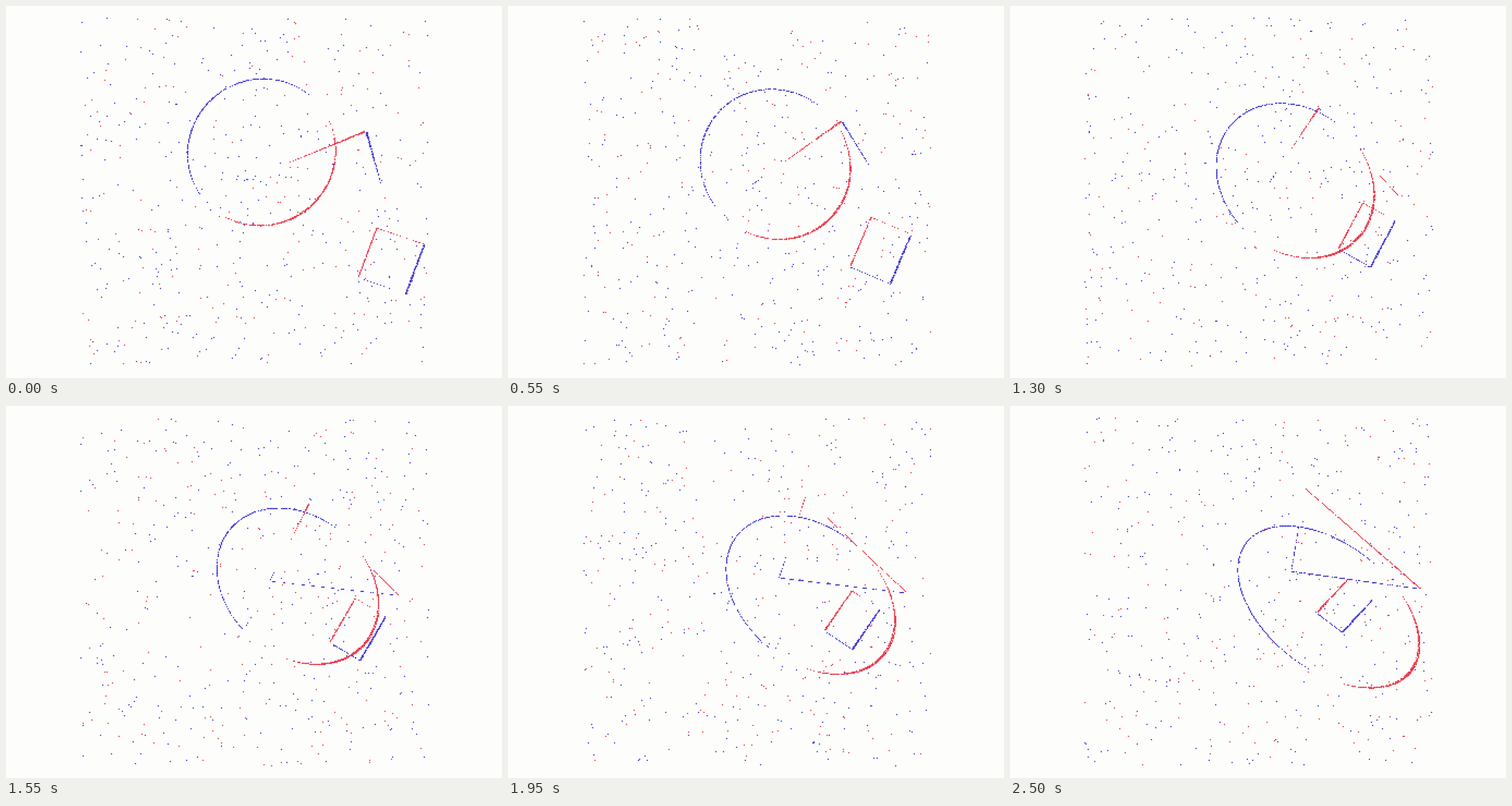
Write an HTML page with a canvas that moves like this. It is 640 by 480 pixels and loops after 2550 ms.

```html
<!DOCTYPE html>
<html lang="en">
<head>
<meta charset="utf-8">
<title>Event camera view of moving shapes</title>
<style>
html, body { margin: 0; width: 100%; height: 100%; overflow: hidden; background: #fdfdfc; }
canvas { display: block; width: 640px; height: 480px; }
</style>
</head>
<body>
<canvas id="view" width="640" height="480"></canvas>
<script>
const ctx = document.getElementById('view').getContext('2d');
const STEP = 50, STEPS = 51;
const N = 320, CELL = 450 / N, LEFT = 96, TOP = 15;
const BLUE = '#1a10c8', RED = '#e4142a', PAPER = '#fdfdfc';
const MIN_SHIFT = 0.3;  // slowest edge, in cells per step, that still fires
const NOISE = 500;

// A value that goes from a to b while the clip runs, off the straight way by bend halfway.
const move = (a, b, bend = 0) => u => a + (b - a) * u + bend * 4 * u * (1 - u);
const point = (x, y) => u => [x(u), y(u)];

const triangle = [
  point(move(304.5, 363.5), move(227, 213, 8)),
  point(move(463, 381, -23), move(161, 106, -1.5)),
  point(move(489, 531, -8.5), move(248, 236, 4))
];

// A parallelogram: its centre and half of each side.
const quad = {
  centre: point(move(496.5, 431, -2.75), move(328.5, 258, 3)),
  across: point(move(30.5, 16.5, -2.5), move(10.5, 12.5)),
  down: point(move(-12, -19.5), move(32, 20.6, 3.7))
};

const ellipse = {
  centre: point(move(330.5, 412, -4), move(189.5, 260)),
  half: point(move(95.5, 117.4, -4.8), move(94.8, 104.5)),
  skew: move(-0.02, 0.467, -0.045)
};

function random(seed) {
  let s = seed * 7919 + 12345;
  return () => {
    s = (s + 0x6D2B79F5) | 0;
    let h = Math.imul(s ^ (s >>> 15), 1 | s);
    h = (h + Math.imul(h ^ (h >>> 7), 61 | h)) ^ h;
    return ((h ^ (h >>> 14)) >>> 0) / 4294967296;
  };
}

// Shapes return the depth of a pixel inside their outline, negative outside.
function polygonDepth(pts) {
  const [a, b, c] = pts;
  const turn = Math.sign((b[0] - a[0]) * (c[1] - b[1]) - (b[1] - a[1]) * (c[0] - b[0]));
  const sides = pts.map(([x, y], i) => {
    const [x1, y1] = pts[(i + 1) % pts.length];
    const k = turn / Math.hypot(x1 - x, y1 - y);
    return { x, y, nx: (y - y1) * k, ny: (x1 - x) * k };
  });
  return (px, py) => {
    let depth = Infinity;
    for (const s of sides) depth = Math.min(depth, (px - s.x) * s.nx + (py - s.y) * s.ny);
    return depth;
  };
}

function quadDepth(u) {
  const [cx, cy] = quad.centre(u), [ax, ay] = quad.across(u), [dx, dy] = quad.down(u);
  const corner = (i, j) => [cx + i * ax + j * dx, cy + i * ay + j * dy];
  return polygonDepth([corner(-1, -1), corner(1, -1), corner(1, 1), corner(-1, 1)]);
}

function ellipseDepth(u) {
  const [cx, cy] = ellipse.centre(u), [a, b] = ellipse.half(u), skew = ellipse.skew(u);
  return (px, py) => {
    const x = (px - cx) / a, y = (py - cy) / b;
    const gx = 2 * (x - skew * y) / a, gy = 2 * (y - skew * x) / b;
    const value = 1 - skew * skew - (x * x - 2 * skew * x * y + y * y);
    return value / (Math.hypot(gx, gy) + 1e-6);
  };
}

const shapes = [ellipseDepth, u => polygonDepth(triangle.map(p => p(u))), quadDepth];

function cell(col, row, color) {
  ctx.fillStyle = color;
  ctx.fillRect(LEFT + col * CELL, TOP + row * CELL, CELL, CELL);
}

// Brightness of a cell, with a soft edge as wide as two smallest shifts.
const light = depth => Math.max(0, Math.min(1, 0.5 + depth / CELL * 0.5 / MIN_SHIFT));

// Cells that brighten by half fire red, those that darken fire blue.
function drawEdges(shape, step, rnd) {
  const now = shape(step / (STEPS - 1)), before = shape((step - 1) / (STEPS - 1));
  for (let row = 0; row < N; row++) {
    for (let col = 0; col < N; col++) {
      const x = LEFT + (col + 0.5) * CELL, y = TOP + (row + 0.5) * CELL;
      const change = light(now(x, y)) - light(before(x, y));
      if (Math.abs(change) >= 0.5 && rnd() < 0.88) cell(col, row, change > 0 ? RED : BLUE);
    }
  }
}

function drawNoise(rnd) {
  for (let i = 0; i < NOISE; i++) {
    cell(Math.floor(rnd() * N), Math.floor(rnd() * N), rnd() < 0.6 ? BLUE : RED);
  }
}

let shown = -1;
function tick() {
  const step = Math.floor(performance.now() / STEP) % STEPS;
  if (step !== shown) {
    shown = step;
    const rnd = random(step + 1);
    ctx.fillStyle = PAPER;
    ctx.fillRect(0, 0, 640, 480);
    drawNoise(rnd);
    shapes.forEach(shape => drawEdges(shape, step, rnd));
  }
  requestAnimationFrame(tick);
}
tick();
</script>
</body>
</html>
```
